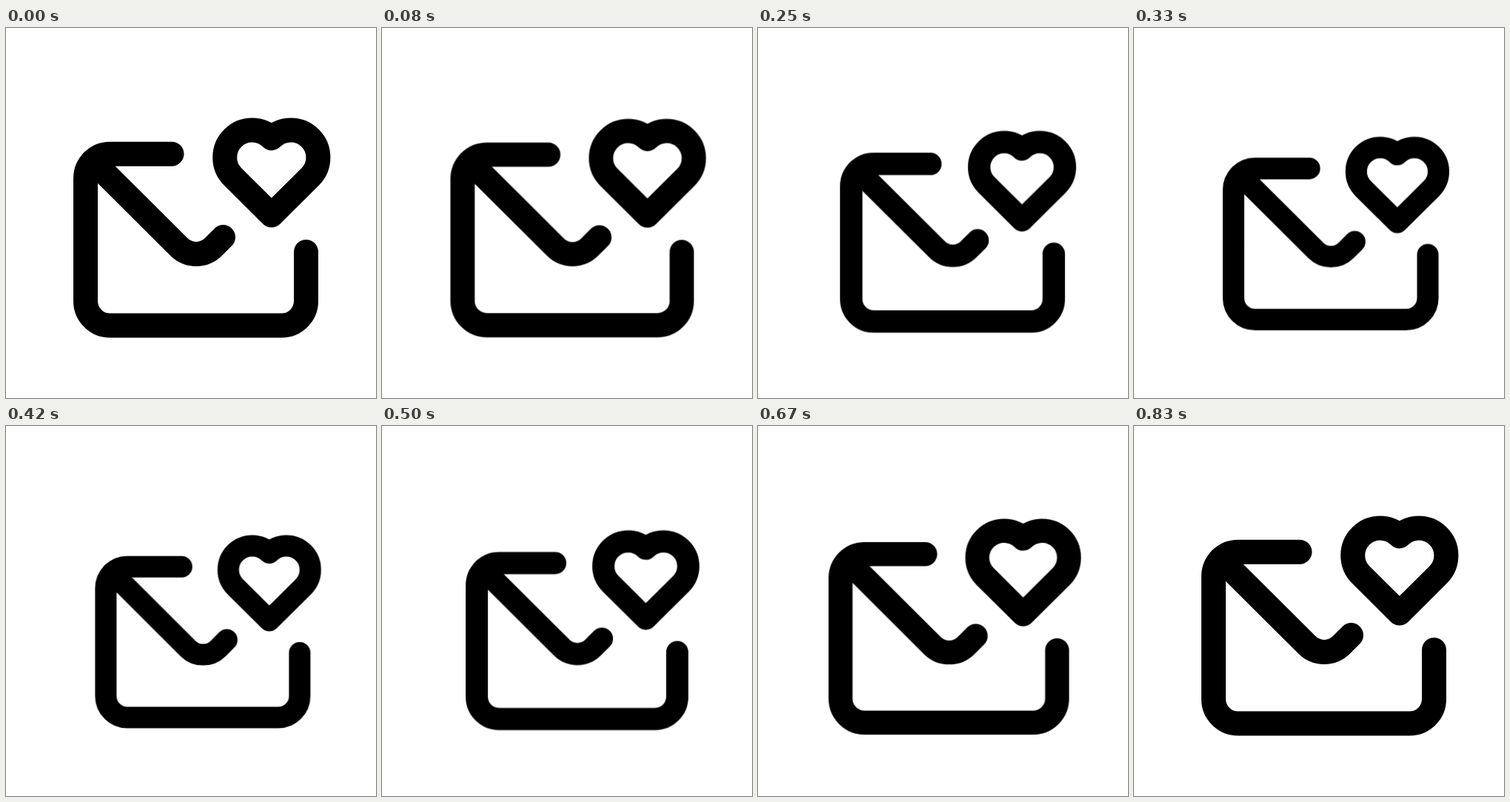
Recreate the animation shown at these times as an HTML page without scripts. Size 500 by 500 pixels, loop 2580 ms.

```html
<!DOCTYPE html>
<html lang="en">
<head>
<meta charset="utf-8">
<title>Love letter</title>
<style>
  html, body { margin: 0; width: 100%; height: 100%; overflow: hidden; background: #fff; }
  svg { display: block; width: 100%; height: 100%; }
  .icon {
    fill: none;
    stroke: #000;
    stroke-width: 33;
    stroke-linecap: round;
    stroke-linejoin: round;
    transform-origin: 334px 335px;
    animation: pulse 2580ms step-end infinite;
  }
  /* eased dip and return, held at about 12 poses per second */
  @keyframes pulse {
    0% { transform: scale(1); }
    3.1% { transform: scale(.994); }
    6.588% { transform: scale(.9695); }
    9.689% { transform: scale(.9185); }
    12.79% { transform: scale(.881); }
    16.278% { transform: scale(.879); }
    19.379% { transform: scale(.909); }
    22.48% { transform: scale(.949); }
    25.968% { transform: scale(.982); }
    29.069% { transform: scale(.996); }
    32.17%, 100% { transform: scale(1); }
  }
</style>
</head>
<body>
<svg viewBox="0 0 500 500">
  <g class="icon">
    <path d="M224 170.2H140.5a33 33 0 0 0-33 33V369a33 33 0 0 0 33 33H372.5a33 33 0 0 0 33-33V302.5"/>
    <path d="M117.2 179.7L233.7 295.8a33 33 0 0 0 46.6 0L293.5 282.6"/>
    <path d="M358.8 148.9A36.8 36.8 0 0 0 306.4 200.9L358.8 253L411.2 200.9A36.8 36.8 0 0 0 358.8 148.9Z"/>
  </g>
</svg>
</body>
</html>
```
